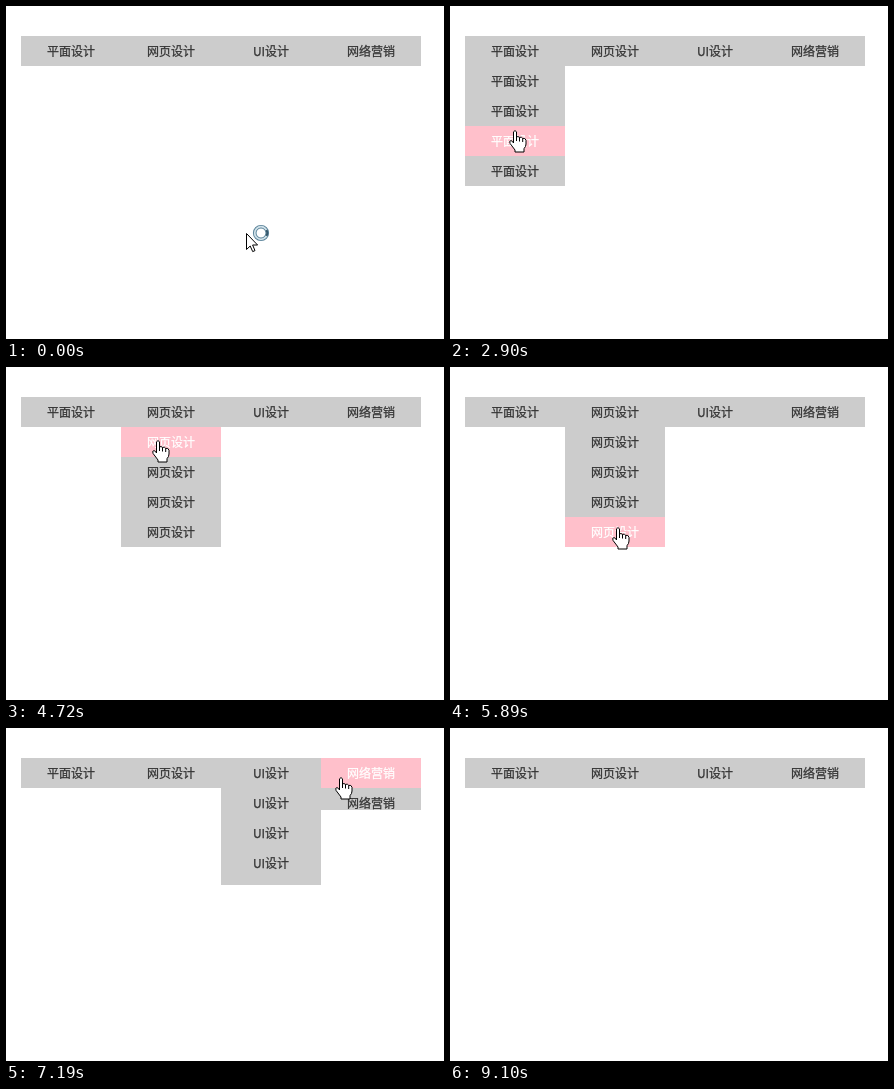
These frames come from a looping animation (438 by 333 pixels, 9650 ms). An HTML page:

```html
<!DOCTYPE html>
<html lang="zh">
<head>
<meta charset="utf-8">
<title>Dropdown menu</title>
<style>
  html, body { margin: 0; width: 100%; height: 100%; overflow: hidden; background: #fff; }
  svg { display: block; width: 438px; height: 333px; }
  text {
    font: 12px "Noto Sans CJK SC", "Noto Sans CJK", sans-serif;
    text-anchor: middle;
    stroke-width: .25px;
  }
</style>
</head>
<body>
<svg viewBox="0 0 438 333">
  <g id="menus"></g>
  <g id="cursor">
    <g id="hand" fill="#fff" stroke="#000" stroke-linejoin="round">
      <path d="M-1.5 1.8Q0-.6 1.5 1.8V7Q3 5.8 4.5 7.4Q6.6 6.5 7.7 8.4Q10.2 7.6 11 10.2V14Q11 16.5 9 18.7V22H0V20L-5 13.4Q-6 10.6-4 10.6Q-2.6 10.8-1.5 13Z"/>
      <path d="M1.5 7V11M4.5 7.4V11.5M7.7 8.4V12" fill="none"/>
    </g>
    <path id="arrow" d="M.5.5V16.5L4.2 13L6.7 18.6L9 17.6L6.6 12H11.6Z" fill="#fff" stroke="#000"/>
    <g id="ring" fill="none">
      <circle cx="15" cy="0" r="6.3" stroke="#557f96" stroke-width="3.6"/>
      <circle cx="15" cy="0" r="6.3" stroke="#cfe0e8" stroke-width="1.8"/>
      <path d="M20.5-3A6.3 6.3 0 0 1 20.5 3" stroke="#35586c" stroke-width="2"/>
    </g>
  </g>
</svg>
<script>
const LOOP = 9650, SLIDE = 400, REFRESH = 78, LEAD = 40;
const ROW = 30, COL = 100, LEFT = 15, TOP = 30, ITEMS = 4;
const HOME = { x: 240, y: 227 };

const menus = ['平面设计', '网页设计', 'UI设计', '网络营销'].map(label => ({ label }));

// Straight pointer moves; each starts LEAD ms before its first screen refresh
const moves = [
  { first: 380, end: 950, x: 65, y: 53 },
  { first: 1770, end: 2160, x: 66, y: 76 },
  { first: 2310, end: 2540, x: 66, y: 112 },
  { first: 2770, end: 2940, x: 65, y: 133 },
  { first: 3170, end: 3340, x: 65, y: 158 },
  { first: 3790, end: 4030, x: 151, y: 48 },
  { first: 4560, end: 4720, x: 152, y: 74 },
  { first: 5020, end: 5560, x: 161, y: 135 },
  { first: 5710, end: 5860, x: 168, y: 160 },
  { first: 6020, end: 6533, x: 260, y: 51 },
  { first: 6730, end: 7272, x: 361, y: 48 },
  { first: 8110, end: 8950, x: 407, y: 305 },
  { first: 9030, end: 9030, x: 419, y: 332 },
  { first: 9100, end: 9100, x: 430, y: 360 }
];

const $ = id => document.getElementById(id);
const clamp = v => Math.max(0, Math.min(1, v));
const swing = p => (1 - Math.cos(Math.PI * clamp(p))) / 2;

function add(parent, name, attrs) {
  const el = document.createElementNS('http://www.w3.org/2000/svg', name);
  for (const key in attrs) el.setAttribute(key, attrs[key]);
  return parent.appendChild(el);
}

function pointer(t) {
  let { x, y } = HOME;
  for (const move of moves) {
    const start = move.first - LEAD;
    const p = clamp((t - start) / (move.end - start));
    x += (move.x - x) * p;
    y += (move.y - y) * p;
  }
  return { x, y };
}

function cellAt({ x, y }) {
  return { col: Math.floor((x - LEFT) / COL), row: Math.floor((y - TOP) / ROW) };
}

// The screen is redrawn at a fixed rate, counted from the start of each move
function snap(t) {
  const move = moves.filter(m => m.first <= t).pop();
  return move ? t - (t - move.first) % REFRESH : 0;
}

// A menu opens when its title is entered and closes when the pointer leaves it
function findHovers() {
  let open = null;
  for (let t = 0; t < LOOP; t++) {
    const { col, row } = cellAt(pointer(t));
    if (open && (open !== menus[col] || row > ITEMS)) {
      open.close = t;
      open = null;
    }
    if (!open && row === 0 && menus[col]) {
      open = menus[col];
      open.open = t;
    }
  }
}

function makeCell(parent, x, y, label) {
  const box = add(parent, 'rect', { x, y, width: COL, height: ROW });
  const text = add(parent, 'text', { x: x + COL / 2, y: y + 20.4 });
  text.textContent = label;
  return on => {
    const ink = on ? '#fff' : '#333';
    box.setAttribute('fill', on ? '#ffc0cb' : '#ccc');
    text.setAttribute('fill', ink);
    text.setAttribute('stroke', ink);
  };
}

function build() {
  menus.forEach((menu, i) => {
    const x = LEFT + i * COL;
    const clip = add($('menus'), 'clipPath', { id: 'clip' + i });
    menu.clip = add(clip, 'rect', { x, y: TOP, width: COL });
    const group = add($('menus'), 'g', { 'clip-path': `url(#clip${i})` });
    menu.cells = Array.from({ length: ITEMS + 1 },
      (_, row) => makeCell(group, x, TOP + row * ROW, menu.label));
  });
}

function draw(time) {
  const t = snap(time);
  const spot = pointer(t);
  const { col, row } = cellAt(spot);
  let over = false;

  menus.forEach((menu, i) => {
    const shown = swing((t - menu.open) / SLIDE) - swing((t - menu.close) / SLIDE);
    const height = ROW + Math.floor(shown * ITEMS * ROW);
    const hit = i === col && row >= 0 && spot.y < TOP + height;
    over = over || hit;
    menu.clip.setAttribute('height', height);
    menu.cells.forEach((paint, r) => paint(hit && r === row));
  });

  $('cursor').setAttribute('transform', `translate(${Math.round(spot.x)} ${Math.round(spot.y)})`);
  $('hand').style.display = over ? '' : 'none';
  $('arrow').style.display = over ? 'none' : '';
  $('ring').style.display = t < moves[0].first ? '' : 'none';
}

findHovers();
build();
const start = performance.now();
function tick() {
  draw((performance.now() - start) % LOOP);
  requestAnimationFrame(tick);
}
tick();
</script>
</body>
</html>
```
